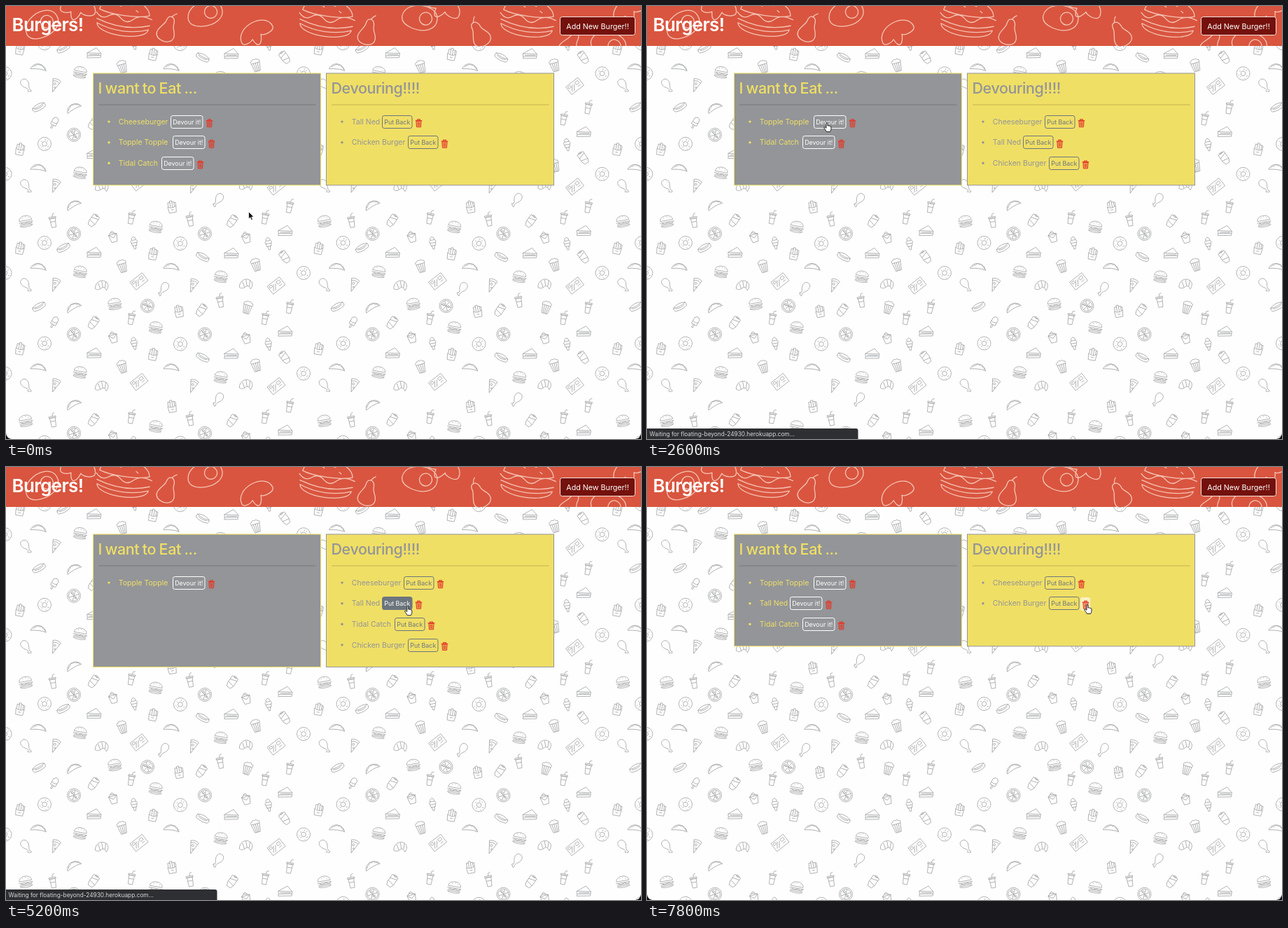
These frames come from a looping animation (907x618 px, 8 s). An HTML page:

```html
<!DOCTYPE html>
<html lang="en">
<head>
<meta charset="utf-8">
<title>Burgers!</title>
<style>
  html, body { margin: 0; width: 100%; height: 100%; overflow: hidden; background: #fefefe; }
  svg { display: block; width: 907px; height: 618px; font-family: Inter, "Open Sans", sans-serif; }
  .doodles { fill: none; stroke: #a0a1a3; stroke-width: .75; stroke-linejoin: round; }
  .sketch { fill: none; stroke: #f5c3b4; stroke-width: 1.3; stroke-linejoin: round; stroke-linecap: round; }
  .title { font-size: 21.5px; font-weight: 500; letter-spacing: -.42px; word-spacing: -.7px; }
  .item { font-size: 10.5px; }
  .button { font-size: 8.9px; }
</style>
</head>
<body>
<svg viewBox="0 0 907 618">
  <defs>
    <clipPath id="header"><rect width="907" height="57"/></clipPath>
    <g id="trash" fill="none" stroke="#e23b2a">
      <path d="M0 2.2H9.6M3 2V.5H6.6V2" stroke-width="1.2"/>
      <path d="M1.2 3L1.8 11.4H7.8L8.4 3Z" fill="#e23b2a" fill-opacity=".35"/>
      <path d="M3.4 4.5V10M4.8 4.5V10M6.2 4.5V10" stroke-width=".7"/>
    </g>
  </defs>
  <rect width="907" height="618" fill="#fefefe"/>
  <g id="doodles" class="doodles"></g>
  <g clip-path="url(#header)">
    <rect width="907" height="57" fill="#d9553f"/>
    <g id="sketch" class="sketch"></g>
  </g>
  <text x="8.5" y="36" font-size="26" font-weight="600" letter-spacing="-.7" fill="#fff">Burgers!</text>
  <rect x="791.5" y="15.5" width="107" height="26" rx="3" fill="#74110c" stroke="#f6e4df"/>
  <text x="845" y="32.5" font-size="10.7" fill="#fff" text-anchor="middle">Add New Burger!!</text>
  <g id="panels"></g>
  <path d="M0 610Q1 617 8 618H0ZM907 610Q906 617 899 618H907Z" fill="#111"/>
  <g id="status">
    <path d="M0 603H298.5Q301.5 603 301.5 606V618H0Z" fill="#2e2f32"/>
    <text x="3.5" y="613.8" font-size="8.3" fill="#d8d9db">Waiting for floating-beyond-24930.herokuapp.com...</text>
  </g>
  <g id="cursor">
    <path id="arrow" d="M0 0V10.5L2.4 8.3L4 12L5.9 11.2L4.3 7.6H7.5Z" fill="#111" stroke="#fff" stroke-width=".8"/>
    <path id="hand" d="M-1 -4Q0 -5.2 1 -4V0Q2 -.8 2.8 .2Q3.9 -.3 4.5 .7Q6 .3 6 2V5Q5.5 7 4.5 8.5H-.5Q-2 5.5 -4.2 3Q-4.2 1.3 -2.5 2L-1 3.3Z" fill="#fff" stroke="#111" stroke-width=".9" stroke-linejoin="round"/>
  </g>
</svg>
<script>
const byId = id => document.getElementById(id);
const disc = (x, y, r) => `M${x - r} ${y}a${r} ${r} 0 1 0 ${2 * r} 0a${r} ${r} 0 1 0 ${-2 * r} 0`;
const stamp = (path, x, y, angle) => `<path d="${path}" transform="translate(${x} ${y}) rotate(${angle})"/>`;

// Wallpaper: each tile has two bands; "both" appears in each, "upper" and "lower" in one.
const TILE_W = 426.5, TILE_H = 284.7, BAND = 143.5;
const doodles = [
  { path: 'M-9 -1C-9 -10 9 -10 9 -1ZM-10 1.5H10L6 4L2 2L-3 4L-7 2M-9 4H9M-9 6C-9 9 9 9 9 6ZM-4 -5h1M0 -6h1M4 -4h1',
    angle: 10, both: '214,315 106,379 307,386', upper: '28,307', lower: '155,425' },
  { path: 'M-10 2L2 -7L10 0V3L-9 6ZM-10 2L10 0M-9 6V9L10 6V3M-7 4L8 2',
    angle: 8, both: '399,320 126,351 322,352' },
  { path: 'M-11 5C-10 -7 6 -9 11 1C5 0 -3 2 -11 5ZM-9 2Q-7 -2 -5 -2Q-3 -6 0 -4Q3 -6 5 -3Q8 -3 9 0',
    angle: 18, both: '47,373 237,373', upper: '97,284', lower: '97,430' },
  { path: 'M-9 -2Q0 1 9 -2Q11 0 9 3Q0 6 -9 3Q-11 0 -9 -2ZM-10 -2Q0 -7 10 -2M-7 0Q0 3 7 0',
    angle: 28, both: '281,358', upper: '82,345', lower: '47,429' },
  { path: disc(0, 0, 9.5) + disc(0, 0, 7.5) + disc(-3, -3, 1.5) + disc(3, 2, 1.5) + 'M0 -7V7M-6 -4L6 4M-6 4L6 -4',
    angle: 15, both: '97,325 284,325', lower: '202,428' },
  { path: 'M-6 -8Q0 -11 6 -8L0 10ZM-5 -5Q0 -8 5 -5' + disc(-1, -2, 1.5) + disc(1, 3, 1),
    angle: 20, both: '70,398 267,399' },
  { path: disc(0, 0, 9.5) + disc(0, 0, 3.3) + 'M-6 -3l2 1M4 -6l-1 2M5 3l2 -1M-3 6l1 -2M-6 3l1 1M0 -7v2M3 6l1 1',
    angle: 12, both: '55,338 249,339 425,381' },
  { path: 'M-1 -10C5 -11 7 -3 3 2C2 4 1 5 1 8Q3 10 1 11Q-1 11 -1 9Q-3 10 -3 8Q-2 7 -1 7Q-1 4 -3 2C-7 -3 -6 -10 -1 -10Z',
    angle: -34, both: '29,398', upper: '303,277', lower: '225,404' },
  { path: 'M-4 -4L-3 9H3L4 -4ZM-5 -4H5V-6H-5ZM0 -6L1 -10L4 -11M-3.5 1H3.5',
    angle: 10, both: '405,286 179,302 370,302', upper: '263,305 67,307', lower: '306,421' },
  { path: 'M-4 0H4L3 4H2L1 9H-1L-2 4H-3ZM-4 0Q-6 -3 -3 -4Q-4 -7 0 -9Q4 -7 3 -4Q6 -3 4 0M-3 -4H3M-3 4H3',
    angle: -10, both: '183,338 375,339' },
  { path: 'M-6 -1L-5 8H5L6 -1Q0 3 -6 -1ZM-5 -1V-7H-2V0M-2 -6V-9H1V1M1 -7H4V0M4 -6H6V-1M-2 4H2',
    angle: 10, both: '20,346 210,354', upper: '237,287', lower: '247,436' },
  { path: 'M-6 -3L-4 9H4L6 -3ZM-3 -3L-2 9M0 -3V9M3 -3L2 9M-6 -3Q-8 -7 -4 -7Q-3 -10 0 -8Q3 -10 4 -7Q8 -7 6 -3',
    angle: -16, both: '166,371 357,369', lower: '345,430' },
  { path: 'M-5 -8H5V4L3 9H-3L-5 4ZM-5 -2L5 -5M-5 2L5 4M-3 -8Q0 -11 3 -8M-2 -8Q0 -6 2 -8',
    angle: -35, both: '398,358', upper: '323,307 125,306', lower: '279,434 125,452' },
  { path: 'M-6 -3L-4 8H4L6 -3ZM-6 -3L-2 -6L6 -3M-3 -5Q0 -11 3 -4M-6 -3L0 2L6 -3',
    angle: -15, both: '153,329 343,330' },
  { path: 'M-11 -7H11V7H-11ZM-8 4L-2 -4M-5 5L1 -3M3 -4H8V0H3ZM3 3H8M-9 -5H-5V-2H-9Z',
    angle: -38, both: '190,393 386,399' },
  { path: 'M-8 7C-11 -2 -3 -9 3 -7C9 -6 10 0 8 5C5 1 2 1 0 4C-2 7 -5 8 -8 7ZM-6 -2L-1 5M-2 -6L2 2M4 -7L5 2',
    angle: 16, both: '137,399 343,397' },
  { path: 'M-4 4V-5Q0 -11 4 -5V4ZM-1 4V9H1V4M-4 0Q0 2 4 -1', angle: -30, lower: '69,451' }
];

const points = (list = '', dy = 0) =>
  list.split(' ').filter(Boolean).map(p => p.split(',').map(Number)).map(([x, y]) => [x, y + dy]);

function tiled(path, x, y, angle) {
  let out = '';
  for (let ty = y - TILE_H; ty < 632; ty += TILE_H)
    for (let tx = x - TILE_W; tx < 922; tx += TILE_W)
      if (tx > -15 && ty > 44) out += stamp(path, tx, ty, angle);
  return out;
}

// Doodles found in only one band lean the other way.
byId('doodles').innerHTML = doodles.flatMap(({ path, angle, both, upper, lower }) => [
  ...[...points(both), ...points(both, BAND)].map(([x, y]) => tiled(path, x, y, angle)),
  ...[...points(upper), ...points(lower)].map(([x, y]) => tiled(path, x, y, -angle))
]).join('');

const sketches = {
  burger: ['M-36 -10C-32 -36 32 -36 36 -10C20 -4 -20 -4 -36 -10ZM-40 -5Q-31 5 -22 -2T-4 -1T14 -2T40 -5M-38 4C-10 13 14 13 38 4M-37 10C-35 28 35 28 37 10C14 19 -14 19 -37 10ZM-10 -20l4 2M6 -22l4 1M16 -15l3 2',
    [168, 19, 8], [458, 20, 8], [745, 20, 8]],
  pear: ['M-4 -14C2 -18 6 -12 6 -5C7 2 14 6 12 14C10 24 -12 24 -13 13C-14 6 -7 0 -6 -7C-6 -10 -6 -12 -4 -14ZM0 -16Q2 -20 5 -22',
    [232, 30, 20], [518, 34, 14], [675, 37, -28], [808, 52, 30]],
  avocado: ['M-26 4C-24 -14 0 -18 14 -12C28 -6 28 12 14 18C0 24 -26 18 -26 4Z' + disc(8, 3, 9),
    [50, 24, -32], [284, 8, -18], [592, 14, 8], [862, 52, 15]],
  mushroom: ['M-24 4C-24 -20 24 -24 26 0C26 8 8 8 6 4C2 18 -6 22 -8 6C-14 10 -24 10 -24 4Z',
    [357, 39, -24], [102, 4, 12], [624, 2, 30], [890, 6, -20]]
};
byId('sketch').innerHTML = Object.values(sketches)
  .map(([path, ...places]) => places.map(p => stamp(path, ...p)).join('')).join('');

// Burger name and the distance from its start to its button.
const burgers = {
  cheese: ['Cheeseburger', 74.8], topple: ['Topple Topple', 77.8], tidal: ['Tidal Catch', 61.5],
  tall: ['Tall Ned', 43.5], chicken: ['Chicken Burger', 80.8]
};
const pages = [
  { from: 0, left: ['cheese', 'topple', 'tidal'], right: ['tall', 'chicken'] },
  { from: 2400, left: ['topple', 'tidal'], right: ['cheese', 'tall', 'chicken'] },
  { from: 4000, left: ['topple'], right: ['cheese', 'tall', 'tidal', 'chicken'] },
  { from: 5400, left: ['topple', 'tall'], right: ['cheese', 'tidal', 'chicken'] },
  { from: 6400, left: ['topple', 'tall', 'tidal'], right: ['cheese', 'chicken'] }
];
const sides = {
  left: { x: 124.5, title: 'I want to Eat ...', label: 'Devour it!', width: 45.5,
    fill: '#939598', ink: '#f0df65', normal: ['none', '#fff', '#fff'], hover: ['#f8f9fa', '#f8f9fa', '#34383c'] },
  right: { x: 457.5, title: 'Devouring!!!!', label: 'Put Back', width: 42.5,
    fill: '#f0df65', ink: '#939598', normal: ['none', '#6c757d', '#6c757d'],
    hover: ['#6c757d', '#6c757d', '#fff'], fading: ['#9d9c72', '#74787a', '#c9c69c'] }
};
const hovers = [
  { from: 1400, to: 2400, side: 'left', row: 0, look: 'hover' },
  { from: 3200, to: 4000, side: 'left', row: 1, look: 'hover' },
  { from: 4200, to: 6600, side: 'right', row: 1, look: 'hover' },
  { from: 6600, to: 6800, side: 'right', row: 1, look: 'fading' },
  { from: 7600, to: 8000, side: 'right', row: 1, look: 'glow' }
];
const waiting = [{ from: 1800, to: 3000 }, { from: 3600, to: 4600 }, { from: 4800, to: 7000 }];
const noTrash = { from: 4000, to: 4400 };
const during = (t, { from, to }) => t >= from && t < to;

// time, x, y, shape
const moves = [
  [0, 346.5, 293.5, 'arrow'], [200, 346.5, 293.5, 'arrow'], [1200, 257, 167, 'arrow'],
  [1400, 257, 171, 'hand'], [2600, 257, 171, 'hand'], [3200, 247, 199, 'hand'],
  [3600, 247, 199, 'arrow'], [4200, 573, 207, 'hand'], [5000, 573, 204, 'hand'],
  [5800, 578, 199, 'hand'], [6200, 578, 199, 'arrow'], [6600, 592, 206, 'arrow'],
  [7000, 592, 206, 'arrow'], [7600, 629, 201, 'hand'], [8000, 629, 201, 'hand']
];

const crisp = v => Math.floor(v) + .5;

function row(name, i, x, side, look, trash) {
  const [text, gap] = burgers[name], y = 165.3 + 29.6 * i;
  const start = x + 36.3, button = crisp(start + gap), bin = button + side.width + 4.7;
  const [fill, border, ink] = side[look] || side.normal;
  return `<circle cx="${x + 22.5}" cy="${y - .2}" r="1.7" fill="${side.ink}"/>
    <text class="item" x="${start}" y="${y + 3.4}" fill="${side.ink}">${text}</text>
    <rect x="${button}" y="${crisp(y - 9)}" width="${side.width}" height="18" rx="2.8" fill="${fill}" stroke="${border}"/>
    <text class="button" x="${button + side.width / 2}" y="${y + 3.4}" text-anchor="middle" fill="${ink}">${side.label}</text>` +
    (look === 'glow' ? `<rect x="${bin - 2.5}" y="${y - 9}" width="14" height="19" rx="3" fill="#fff" opacity=".6"/>` : '') +
    (trash ? `<use href="#trash" x="${bin}" y="${y - 4}"/>` : '');
}

function panel(key, names, height, hover, trash) {
  const side = sides[key], { x } = side;
  return `<rect x="${x}" y="96" width="325" height="${height}" fill="${side.fill}" stroke="${side.ink}"/>
    <text class="title" x="${x + 7}" y="125" fill="${side.ink}">${side.title}</text>
    <path d="M${x + 7.5} 141H${x + 318}" stroke="#000" stroke-opacity=".25" stroke-width=".8"/>` +
    names.map((name, i) =>
      row(name, i, x, side, hover && hover.side === key && hover.row === i ? hover.look : 'normal', trash)).join('');
}

function drawPage(t) {
  const page = pages.filter(p => p.from <= t).pop();
  const hover = hovers.find(h => during(t, h)), trash = !during(t, noTrash);
  const height = 71 + 29.6 * Math.max(3, page.left.length, page.right.length);
  byId('panels').innerHTML = ['left', 'right'].map(k => panel(k, page[k], height, hover, trash)).join('');
  byId('status').style.display = waiting.some(w => during(t, w)) ? '' : 'none';
}

function drawCursor(t) {
  const i = moves.findIndex(m => m[0] > t);
  const [t0, x0, y0, shape] = moves[i - 1], [t1, x1, y1] = moves[i];
  const u = (t - t0) / (t1 - t0), k = u * u * (3 - 2 * u);
  byId('cursor').setAttribute('transform', `translate(${x0 + (x1 - x0) * k} ${y0 + (y1 - y0) * k})`);
  for (const id of ['arrow', 'hand']) byId(id).style.display = id === shape ? '' : 'none';
}

const LOOP = 8000, STEP = 200, began = performance.now();
let shown = -1;
function tick() {
  const elapsed = Math.max(0, performance.now() - began) % LOOP;
  const t = Math.floor(elapsed / STEP) * STEP;
  if (t !== shown) {
    shown = t;
    drawPage(t);
    drawCursor(t);
  }
  requestAnimationFrame(tick);
}
tick();
</script>
</body>
</html>
```
